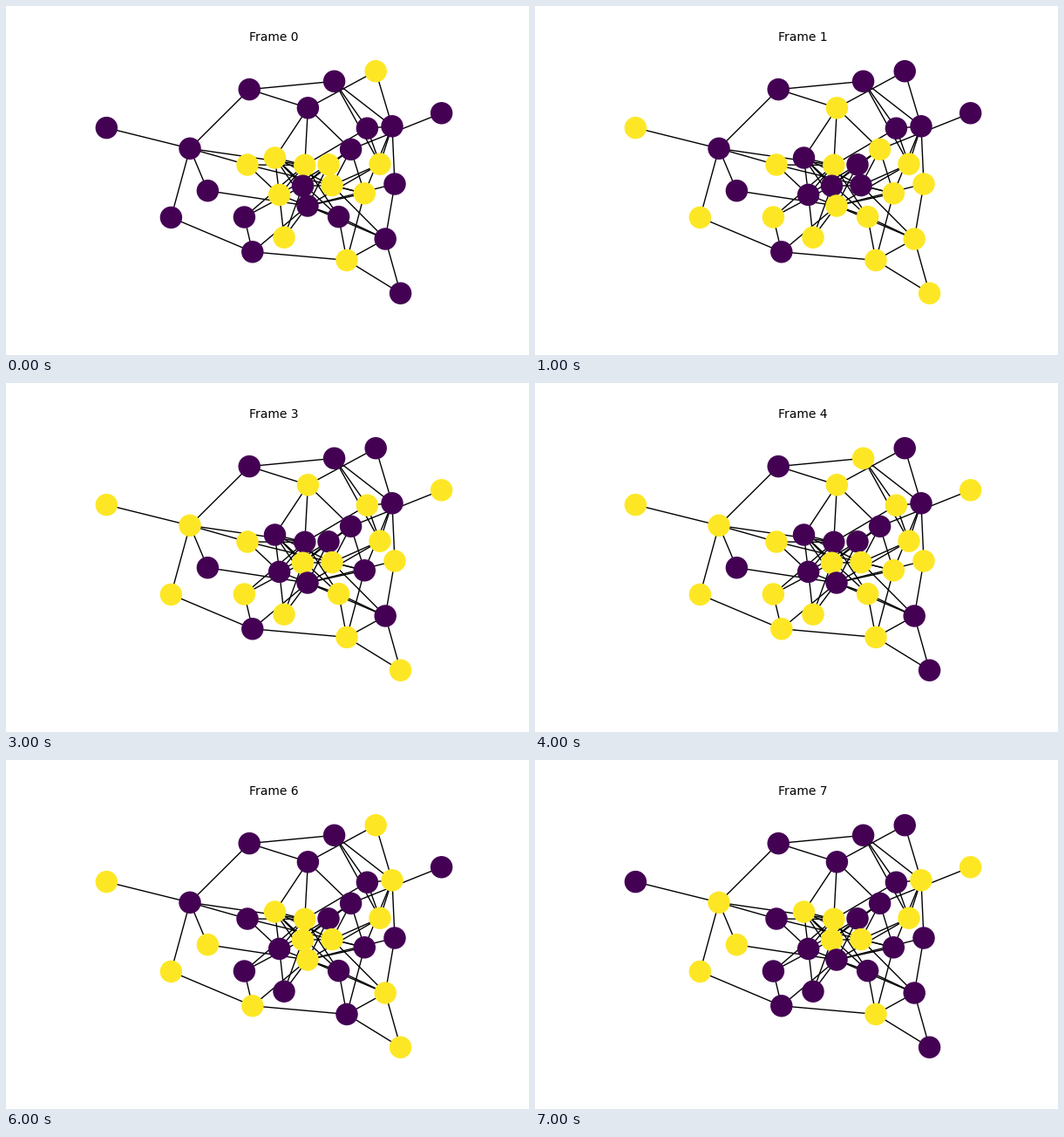
A matplotlib script that plays this animation: 600 px wide and 400 px high, repeating every 8000 ms.

```python
import matplotlib.pyplot as plt
from matplotlib.animation import FuncAnimation
from matplotlib.collections import LineCollection

# Node positions in stage pixels, y pointing down.
NODES = {
    "A": (115.35, 139.6), "B": (211, 163.3), "C": (279.2, 95.6),
    "D": (376.6, 86.3), "E": (424.2, 74.73), "F": (499.65, 122.8),
    "G": (346.4, 116.8), "H": (414.4, 140.2), "I": (443, 137.8),
    "J": (395.6, 164.3), "K": (277, 182), "L": (308.5, 174),
    "M": (342.8, 182.4), "N": (370, 181.8), "O": (429, 181.2),
    "P": (446, 204), "Q": (340.5, 206.2), "R": (374, 205.6),
    "S": (411.3, 214.8), "T": (313.6, 216.4), "U": (346, 229),
    "V": (381.6, 241.6), "W": (231.4, 211.7), "X": (189.4, 242.4),
    "Y": (273.4, 242), "Z": (319, 265.2), "a": (282.8, 281.8),
    "b": (391, 291.4), "c": (435.2, 267), "d": (452.6, 329.27),
}

EDGES = (
    "AB BC CD CG BX BW BK BM Xa Ya ab bd cd bc Pc "
    "FJ EI EG DH DI DO GL GM GJ HI HM HO IO IP IS "
    "JS JR JQ JN KM KS KT LM LQ LR LT LV LU "
    "MT MV MY NQ NT NU OR OU PU QR QY QZ RS Rc "
    "SU Sb TU TZ UW UZ Ua Uc UV Vb Vc"
).split()

# Nodes lit in each one-second step.
LIT = [
    "EKLMNORSTZb",
    "AGJKMOPSUVXYZbcd",
    "CFLMNOPRVWXZabc",
    "ABFGHKOPQRVXYZbd",
    "ABDFGHKOPQRSVXYZab",
    "ACDEFGIKLNOQTUVWacd",
    "AEILMOQRUWXacd",
    "BFILMOQRWXb",
]

fig, ax = plt.subplots(figsize=(6, 4), dpi=100)
fig.subplots_adjust(left=0.125, right=0.9, bottom=0.11, top=0.88)
ax.set_xlim(75, 540)
ax.set_ylim(356, 48)
ax.axis("off")

segments = [(NODES[p], NODES[q]) for p, q in EDGES]
ax.add_collection(LineCollection(segments, colors="black", linewidths=1, zorder=1),
                  autolim=False)
xs, ys = zip(*NODES.values())
dots = ax.scatter(xs, ys, s=300, c=[0] * len(xs), cmap="viridis",
                  vmin=0, vmax=1, linewidths=1, zorder=2, clip_on=False)
title = ax.set_title("", fontsize=10, pad=6)


def update(i):
    dots.set_array([float(n in LIT[i]) for n in NODES])
    title.set_text(f"Frame {i}")
    return dots, title


anim = FuncAnimation(fig, update, frames=len(LIT), interval=1000,
                     repeat=True, repeat_delay=0)
plt.show()
```
